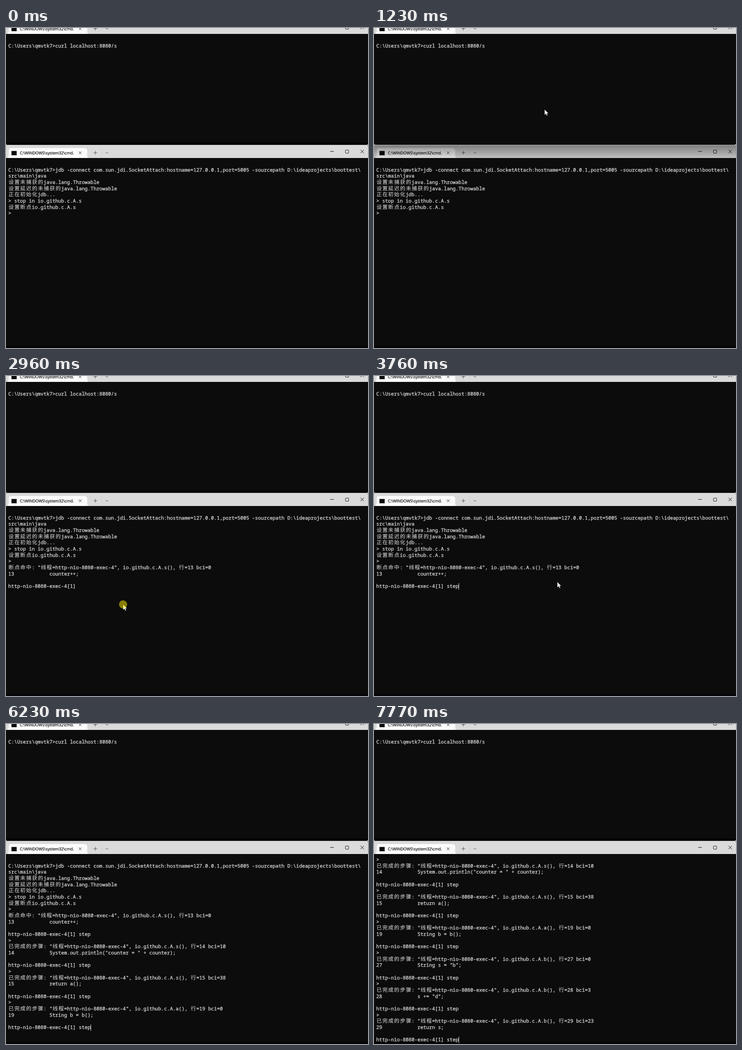
Animation, 796 px wide and 704 px high, one loop 8000 ms. Source, as an HTML page:

```html
<!DOCTYPE html>
<html lang="zh-CN">
<head>
<meta charset="utf-8">
<title>jdb session</title>
<style>
  html, body { margin: 0; width: 100%; height: 100%; overflow: hidden; background: #060308; }
  #stage { position: relative; width: 796px; height: 704px; overflow: hidden; background: #bdbac0; }
  .win { position: absolute; left: 0; width: 796px; background: #0c0c0c; overflow: hidden; }
  #top { top: -15px; height: 272px; border-radius: 0 0 4px 4px; }
  #bottom { top: 258px; height: 446px; border-radius: 3px 3px 0 0; }
  .bar { position: absolute; left: 0; top: 0; width: 796px; height: 28px; }
  .term {
    position: absolute; left: 5px; top: 34.1px; color: #ccc; white-space: pre;
    font: 500 10.775px/13.66px "Noto Sans Mono", monospace;
    -webkit-text-stroke: .38px #ccc;
    text-rendering: geometricPrecision; font-variant-ligatures: none;
  }
  .term div { height: 13.66px; }
  .cjk {
    position: relative; left: .5px; line-height: 0; letter-spacing: 1.43px;
    font-family: "Noto Sans CJK SC", "Noto Sans CJK", sans-serif; font-size: 11.5px; font-weight: 400;
    -webkit-text-stroke-width: .1px;
  }
  .caret { position: absolute; width: 1px; height: 14px; background: #f2f2f2; }
  .shade { position: absolute; left: 0; width: 796px; }
  #cast { top: 0; height: 28px; background: linear-gradient(rgba(0,0,0,.42), rgba(0,0,0,.12)); }
  #dim { bottom: 0; height: 8px; background: linear-gradient(transparent, #000); }
  #edge { bottom: 0; height: 4px; background: #060308; }
  #mouse { position: absolute; left: 0; top: 0; overflow: visible; }
</style>
</head>
<body>
<div id="stage">
  <svg width="0" height="0" style="position:absolute">
    <symbol id="bar" viewBox="0 0 796 28">
      <rect width="796" height="28" fill="#dadada"/>
      <path d="M0 28Q6 28 6 22V12Q6 6 12 6H172Q178.500 6 178.500 12V22Q178.500 28 184 28Z" fill="#fbfbfb"/>
      <rect x="12" y="12.500" width="11.500" height="9.500" fill="#0c0c0c"/>
      <text x="30.500" y="20.300" font-family="'Open Sans', sans-serif" font-size="8.700" font-weight="500"
        text-rendering="geometricPrecision" fill="#111" stroke="#111" stroke-width=".25">C:\WINDOWS\system32\cmd.</text>
      <path d="M210.500 7V27" stroke="#cdcdcd"/>
      <g fill="none" stroke="#2a2a2a">
        <path d="M160 13.500l6 6m0-6l-6 6"/>
        <path d="M192.500 16.500h8m-4-4v8" stroke="#555"/>
        <path d="M219 15l3 3 3-3" stroke="#555"/>
        <path d="M713 13.500h8" stroke="#111"/>
        <rect x="746.500" y="10.500" width="7" height="7" rx="1" stroke="#111"/>
        <path d="M779.500 10l7.500 7.500m0-7.500l-7.500 7.500" stroke="#111"/>
      </g>
    </symbol>
  </svg>

  <div class="win" id="top">
    <svg class="bar"><use href="#bar"/></svg>
    <div class="shade" id="dim"></div>
    <div class="term" id="curl"></div>
    <div class="caret" id="caretTop"></div>
  </div>

  <div class="win" id="bottom">
    <svg class="bar"><use href="#bar"/></svg>
    <div class="shade" id="cast"></div>
    <div class="shade" id="edge"></div>
    <div class="term" id="jdb"></div>
    <div class="caret" id="caretBottom"></div>
  </div>

  <svg id="mouse" width="12" height="16">
    <path d="M0 0V12.300L2.900 9.700 4.900 14 7 13.100 5.100 8.900H8.800Z" fill="#fff" stroke="#111" stroke-width=".6"/>
    <circle id="click" r="9" fill="#fff000" fill-opacity=".5"/>
  </svg>
</div>

<script>
const LOOP = 8000, ROWS = 30, CELL = 6.465, LINE = 13.66;
const $ = id => document.getElementById(id);
const home = 'C:\\Users\\qmvtk7>';
const thread = 'http-nio-8080-exec-4';

// [shown at, text]
const intro = [
  '',
  home + 'jdb -connect com.sun.jdi.SocketAttach:hostname=127.0.0.1,port=5005 -sourcepath D:\\ideaprojects\\boottest\\',
  'src\\main\\java',
  '设置未捕获的java.lang.Throwable',
  '设置延迟的未捕获的java.lang.Throwable',
  '正在初始化jdb...',
  '> stop in io.github.c.A.s',
  '设置断点io.github.c.A.s'
].map(text => [0, text]);

// prompt time, output time, typing time, method, line, bci, code
const stops = [
  [0, 2090, 3760, 's', 13, 0, 'counter++;'],
  [4350, 4420, 4900, 's', 14, 10, 'System.out.println("counter = " + counter);'],
  [5170, 5170, 5570, 's', 15, 38, 'return a();'],
  [5900, 5900, 6230, 'a', 19, 0, 'String b = b();'],
  [6430, 6430, 6760, 'b', 27, 0, 'String s = "b";'],
  [6960, 6960, 7300, 'b', 28, 3, 's += "d";'],
  [7500, 7500, 7770, 'b', 29, 23, 'return s;']
];

const within = (t, a, b) => t >= a && t < b;
const show = (el, on) => { el.style.visibility = on ? 'visible' : 'hidden'; };

function linesAt(t) {
  const all = [...intro];
  stops.forEach(([open, out, type, method, line, bci, code], i) => {
    const label = i ? '已完成的步骤' : '断点命中';
    all.push(
      [open, '>'],
      [out, `${label}: "线程=${thread}", io.github.c.A.${method}(), 行=${line} bci=${bci}`],
      [out, String(line).padEnd(14) + code],
      [out, ''],
      [out, `${thread}[1] ` + (t >= type ? 'step' : '')]
    );
  });
  return all.filter(([at]) => t >= at).map(([, text]) => text).slice(-ROWS);
}

function print(el, lines) {
  const html = lines.map(s => '<div>' + s.replace(/>/g, '&gt;')
    .replace(/[\u4e00-\u9fff]+/g, '<span class="cjk">$&</span>') + '</div>').join('');
  if (el.dataset.html !== html) el.innerHTML = el.dataset.html = html;
}

function placeCaret(el, row, col, on) {
  el.style.left = Math.round(5 + col * CELL - .2) + 'px';
  el.style.top = Math.round(34 + row * LINE) + 'px';
  show(el, on);
}

// time, x, y of the pointer tip
const path = [
  [130, 735, 669], [530, 375, 179], [2490, 375, 179],
  [2880, 257.5, 502.5], [3030, 257.5, 502.5], [3230, 386, 461], [3300, 403, 453]
];

function pointAt(t) {
  const i = path.findIndex(p => p[0] > t);
  if (i < 0) return path[path.length - 1].slice(1);
  if (i === 0) return path[0].slice(1);
  const [a, x0, y0] = path[i - 1], [b, x1, y1] = path[i];
  const u = (t - a) / (b - a), k = u * u * (3 - 2 * u);
  return [x0 + (x1 - x0) * k, y0 + (y1 - y0) * k];
}

function draw(t) {
  const lines = linesAt(t);
  const last = lines.length - 1;
  print($('jdb'), lines);
  placeCaret($('caretBottom'), last, lines[last].length, t >= 3230 && !within(t, 4290, 4350));

  const sent = t >= 1880;
  placeCaret($('caretTop'), sent ? 2 : 1, sent ? 0 : 37, within(t, 690, 1230) || within(t, 1820, 2490));

  const topActive = within(t, 690, 2960);
  show($('cast'), topActive);
  show($('dim'), !topActive);

  const [x, y] = pointAt(t);
  $('mouse').style.transform = `translate(${x}px, ${y}px)`;
  show($('mouse'), within(t, 130, 1880) || within(t, 2490, 5170));
  $('click').style.display = within(t, 690, 750) || within(t, 2960, 3030) ? '' : 'none';
}

print($('curl'), ['', home + 'curl localhost:8080/s']);
const start = performance.now();
function tick() {
  draw((performance.now() - start) % LOOP);
  requestAnimationFrame(tick);
}
tick();
</script>
</body>
</html>
```
